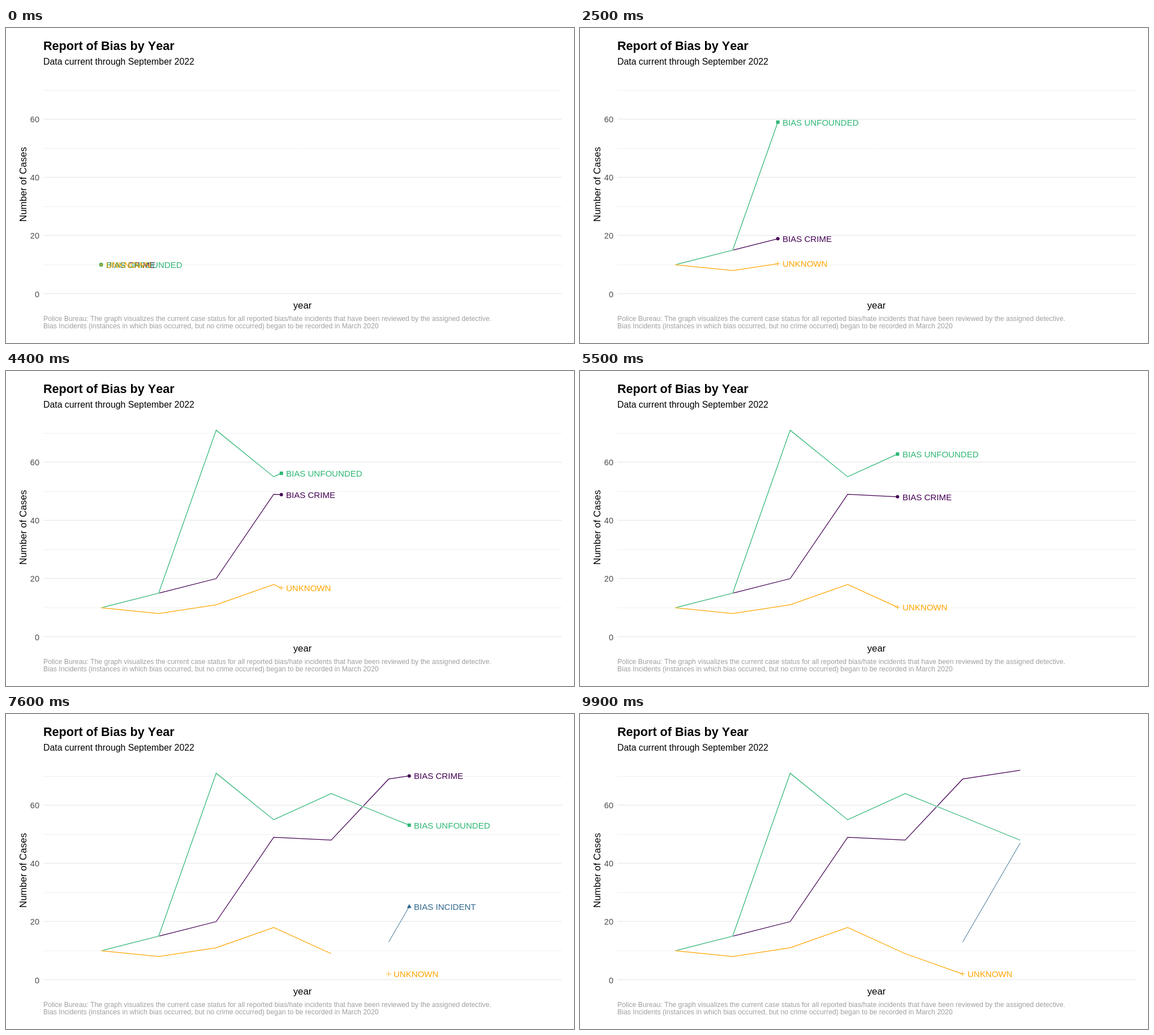
These frames come from a looping animation (1004x558 px, 10000 ms). An HTML page with a canvas:

```html
<!DOCTYPE html>
<html lang="en">
<head>
<meta charset="utf-8">
<title>Report of Bias by Year</title>
<style>
  html, body { margin: 0; width: 100%; height: 100%; overflow: hidden; background: #fff; }
  canvas { display: block; }
</style>
</head>
<body>
<canvas id="chart" width="1004" height="558"></canvas>
<script>
const ctx = document.getElementById('chart').getContext('2d');
const FONT = '"Liberation Sans", Arial, sans-serif';
const LEFT = 66, RIGHT = 982.5;
const FRAME_MS = 100, FRAMES = 100, LAST = FRAMES - 1;
const X = year => 168.2 + 101.65 * year;
const Y = value => 470.9 - 5.155 * value;

// Each year is reached on a whole frame.
const yearFrames = Array.from({ length: 8 }, (_, i) => Math.round(i * LAST / 7));

// The closing 0 is only a heading for the markers; it is never plotted itself.
const series = [
  { label: 'BIAS CRIME', color: '#440154', start: 0, values: [10, 15, 20, 49, 48, 69, 72, 0], mark: circle },
  { label: 'BIAS INCIDENT', color: '#31688e', start: 5, values: [13, 47, 0], mark: triangle, width: 1 },
  { label: 'BIAS UNFOUNDED', color: '#2db674', start: 0, values: [10, 15, 71, 55, 64, 56, 48, 0], mark: square },
  { label: 'UNKNOWN', color: '#ffa500', start: 0, values: [10, 8, 11, 18, 9, 2], mark: plus }
];

function circle(x, y) {
  ctx.beginPath();
  ctx.arc(x, y, 3, 0, 2 * Math.PI);
  ctx.fill();
}
function square(x, y) {
  ctx.fillRect(x - 3, y - 3, 6, 6);
}
function triangle(x, y) {
  ctx.beginPath();
  ctx.moveTo(x, y - 4.7);
  ctx.lineTo(x + 4, y + 2.4);
  ctx.lineTo(x - 4, y + 2.4);
  ctx.fill();
}
function plus(x, y) {
  stroke([[x - 4.5, y], [x + 4.5, y]], 0.75);
  stroke([[x, y - 4.5], [x, y + 4.5]], 0.75);
}

function stroke(points, width, color = ctx.strokeStyle) {
  ctx.strokeStyle = color;
  ctx.lineWidth = width;
  ctx.beginPath();
  points.forEach(([x, y]) => ctx.lineTo(x, y));
  ctx.stroke();
}

function text(string, x, y, size, color = '#000', align = 'left', weight = 'normal') {
  ctx.font = `${weight} ${size}px ${FONT}`;
  ctx.fillStyle = color;
  ctx.textAlign = align;
  ctx.fillText(string, x, y);
}

function drawBackground() {
  ctx.fillStyle = '#fff';
  ctx.fillRect(0, 0, 1004, 558);
  for (let v = 0; v <= 70; v += 10) {
    const major = v % 20 === 0;
    const y = Math.floor(Y(v)) + 0.5;
    stroke([[LEFT, y], [RIGHT, y]], major ? 1.4 : 1, major ? '#ebebeb' : '#f0f0f0');
    if (major) text(v, 59, Math.round(Y(v) + 5.6), 14.5, '#4d4d4d', 'right');
  }
  text('Report of Bias by Year', 66, 39, 21.6, '#000', 'left', 'bold');
  text('Data current through September 2022', 66, 65, 15.85);
  text('year', 524, 497, 16.8, '#000', 'center');
  text('Police Bureau: The graph visualizes the current case status for all reported bias/hate incidents that have been reviewed by the assigned detective.', 66, 519, 12.26, '#a0a0a0');
  text('Bias Incidents (instances in which bias occurred, but no crime occurred) began to be recorded in March 2020', 66, 532, 12.3, '#a0a0a0');
  ctx.save();
  ctx.translate(36, 277);
  ctx.rotate(-Math.PI / 2);
  text('Number of Cases', 0, 0, 17, '#000', 'center');
  ctx.restore();
}

// Returns the visible line and marker position of one series.
function pose({ start, values }, frame) {
  const points = values.map((v, i) => [X(start + i), Y(v)]);
  const end = yearFrames[start + values.length - 1];
  if (frame < yearFrames[start]) return { line: [], tip: null };
  if (frame === LAST) {
    return end === LAST
      ? { line: points.slice(0, -1), tip: null }
      : { line: points, tip: points.at(-1) };
  }
  if (frame > end) return { line: points.slice(0, -1), tip: points.at(-1) };

  const year = yearFrames.findLastIndex(f => f <= frame);
  const from = yearFrames[year];
  const part = (frame - from) / (yearFrames[year + 1] - from);
  const i = year - start;
  const a = points[i], b = points[i + 1] || a;
  const tip = [a[0] + (b[0] - a[0]) * part, a[1] + (b[1] - a[1]) * part];
  return { line: [...points.slice(0, i + 1), tip], tip };
}

function draw(frame) {
  drawBackground();
  const poses = series.map(s => ({ ...s, ...pose(s, frame) }));
  const shown = poses.filter(p => p.tip);
  ctx.save();
  ctx.beginPath();
  ctx.rect(LEFT, 80, RIGHT - LEFT, 420);
  ctx.clip();
  for (const p of poses) {
    // A white base keeps a covered line from tinting the one above it.
    stroke(p.line, 2.4, '#fff');
    stroke(p.line, p.width || 1.25, p.color);
  }
  for (const p of shown) {
    ctx.strokeStyle = ctx.fillStyle = p.color;
    p.mark(...p.tip);
  }
  for (const { label, tip: [x, y], color } of shown) {
    text(label, Math.round(x + 8.4), Math.round(y + 5.8), 15.05, color);
  }
  ctx.restore();
}

function tick() {
  draw(Math.floor(performance.now() / FRAME_MS) % FRAMES);
  requestAnimationFrame(tick);
}
ctx.fontKerning = 'none';
tick();
</script>
</body>
</html>
```
